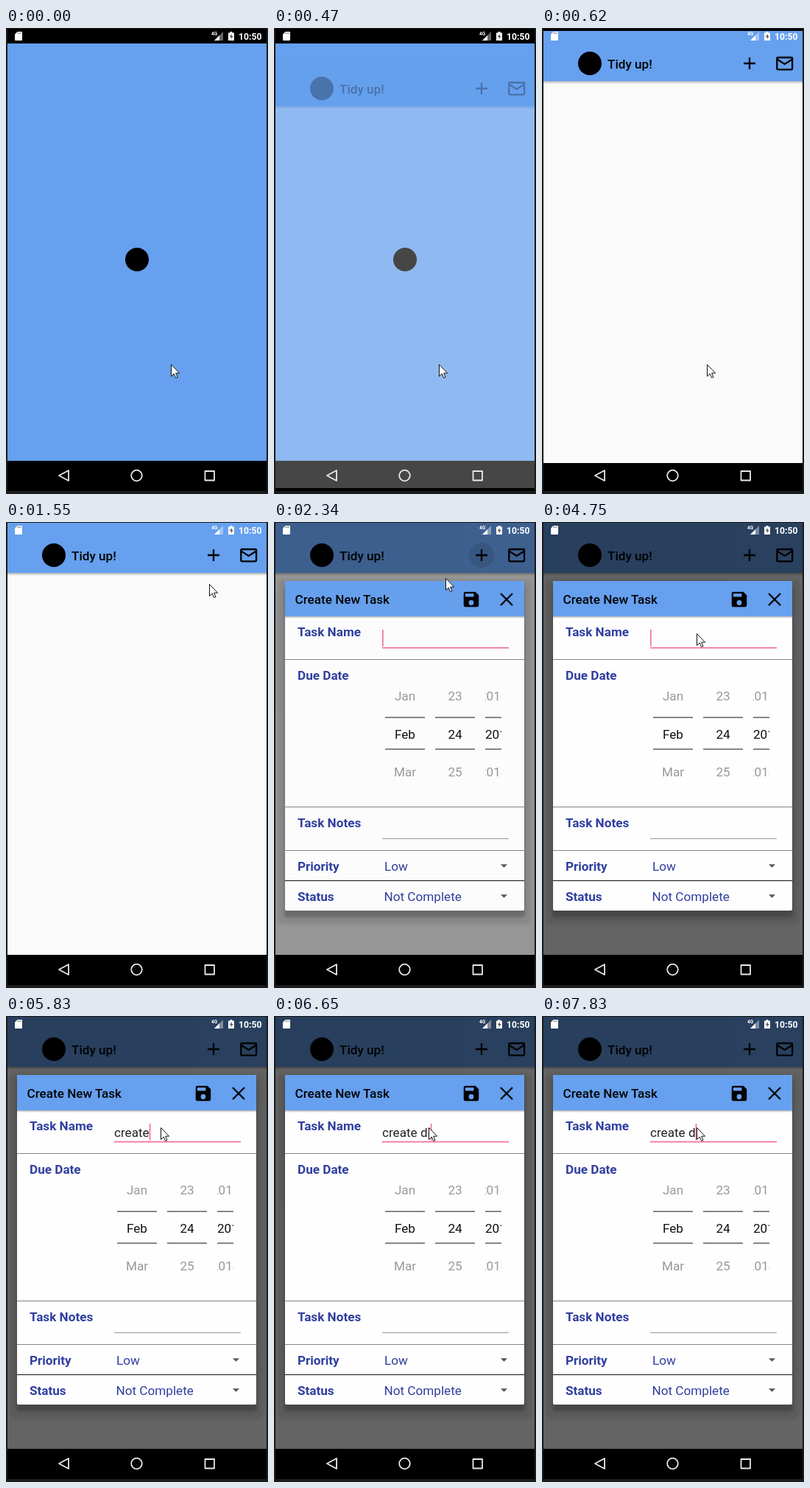
An HTML page for the animation above (8000 ms loop, 356x632 px).

```html
<!DOCTYPE html>
<html lang="en">
<head>
<meta charset="utf-8">
<title>Task list app</title>
<style>
  html, body { margin: 0; width: 100%; height: 100%; overflow: hidden; background: #1b1b1b; }
  svg { display: block; width: 100%; height: 100%; }
  text { font: 17.14px Roboto, sans-serif; white-space: pre; }
  .title { font-weight: 500; }
  .label { font-weight: 700; fill: #303f9f; }
  .choice { fill: #303f9f; }
  .near { fill: #999; }
  .mid { text-anchor: middle; }
  .line { fill: none; stroke: #000; stroke-width: 2.3; }

  #home, #dim, #dialog, #ripple, #pointer { animation: 8s step-end infinite; }
  #home { animation-name: open; }
  #dim { animation-name: dim; }
  #dialog { animation-name: appear; }
  #ripple { animation-name: ripple; }
  #pointer { animation-name: point; }

  @keyframes open {
    0% { opacity: 0; transform: translateY(37px); }
    5.875% { opacity: .28; transform: translateY(37px); }
    7.75% { opacity: 1; transform: translateY(3px); }
    9.25%, 100% { opacity: 1; transform: none; }
  }
  @keyframes dim {
    0% { opacity: 0; }
    29.25% { opacity: .4; }
    30.75% { opacity: .58; }
    32.25%, 100% { opacity: .6; }
  }
  @keyframes appear {
    0% { opacity: 0; }
    29.25% { opacity: .985; }
    30.75%, 100% { opacity: 1; }
  }
  @keyframes ripple {
    0% { opacity: 0; }
    29.25% { opacity: .1; }
    30.75% { opacity: .04; }
    32.25%, 100% { opacity: 0; }
  }
  @keyframes point {
    0% { transform: translate(224px, 456px); }
    12.625% { transform: translate(228px, 446px); }
    14.125% { transform: translate(238px, 418px); }
    16% { transform: translate(255px, 260px); }
    17.5% { transform: translate(269px, 116px); }
    19.375% { transform: translate(276px, 84px); }
    20.875% { transform: translate(280px, 65px); }
    22.375% { transform: translate(283px, 53px); }
    23.875% { transform: translate(284px, 49px); }
    27.375% { transform: translate(273px, 58px); }
    29.25% { transform: translate(233px, 76px); }
    30.75% { transform: translate(218px, 92px); }
    32.25% { transform: translate(210px, 105px); }
    34.125%, 100% { transform: translate(210px, 151px); }
  }
</style>
</head>
<body>
<svg viewBox="0 0 356 632">
  <defs>
    <linearGradient id="fall" x2="0" y2="1">
      <stop stop-opacity=".28"/><stop offset="1" stop-opacity="0"/>
    </linearGradient>
    <filter id="soft" x="-10%" y="-10%" width="120%" height="120%"><feGaussianBlur stdDeviation="2"/></filter>
    <clipPath id="yearClip"><path d="M287 215h22v150h-22z"/></clipPath>
    <path id="arrow" d="M-4.5-2.2h9L0 2.3z" fill="#555"/>
  </defs>

  <path fill="#000" d="M2 1h352v627H2z"/>
  <path fill="#66a0ee" d="M2 21h352v566H2z"/>
  <circle cx="178" cy="314" r="16"/>

  <g id="home">
    <path fill="#fafafa" d="M2 69h352v518H2z"/>
    <path fill="#66a0ee" d="M2 1h352v68H2z"/>
    <path fill="url(#fall)" d="M2 69h352v4H2z"/>
    <circle cx="65" cy="45" r="16"/>
    <text class="title" x="89" y="52">Tidy up!</text>
    <circle id="ripple" cx="282" cy="45" r="17"/>
    <path class="line" d="M274 45h16M282 37v16"/>
    <rect class="line" x="319.3" y="37" width="20.8" height="16.3" rx="1.2"/>
    <path class="line" d="M319.5 39.5l10.2 6.4 10.2-6.4"/>
  </g>

  <path id="dim" d="M2 1h352v586H2z"/>

  <g id="dialog">
    <rect x="5" y="78" width="345" height="468" rx="8" opacity=".09" filter="url(#soft)"/>
    <rect x="14" y="86" width="327" height="450" rx="4" opacity=".22" filter="url(#soft)"/>
    <rect x="15" y="80" width="325" height="447" rx="2" fill="#fefefe"/>
    <path fill="#66a0ee" d="M15 128V82q0-2 2-2h321q2 0 2 2v46z"/>
    <path fill="url(#fall)" d="M15 128h325v3H15z"/>
    <text class="title" x="28.5" y="111">Create New Task</text>
    <path transform="translate(254.3 91.3) scale(1.14)" fill-rule="evenodd"
      d="M17 3H5a2 2 0 0 0-2 2v14a2 2 0 0 0 2 2h14a2 2 0 0 0 2-2V7zM12 19a3 3 0 1 1 0-6 3 3 0 0 1 0 6zM15 9H5V5h10z"/>
    <path class="line" d="M308 97l16 16M324 97l-16 16"/>

    <path stroke="#858585" d="M15 186.5h325M15 386.5h325M15 445.5h325"/>
    <path stroke="#111" d="M15 486.5h325"/>
    <path stroke="#999" d="M147 429.5h172"/>
    <path stroke="#f5709f" stroke-width="1.7" d="M147 170.7h172"/>

    <g class="label">
      <text class="label" x="32" y="155">Task Name</text>
      <text class="label" x="32" y="214">Due Date</text>
      <text class="label" x="32" y="414">Task Notes</text>
      <text class="label" x="32" y="473">Priority</text>
      <text class="label" x="32" y="514">Status</text>
    </g>
    <text class="choice" x="150" y="473">Low</text>
    <text class="choice" x="149.5" y="514">Not Complete</text>
    <use href="#arrow" x="312.5" y="466.5"/>
    <use href="#arrow" x="312.5" y="507.5"/>

    <path stroke="#777" stroke-width="1.7" d="M151 265.2h54M219 265.2h54M287 265.2h22M151 308.2h54M219 308.2h54M287 308.2h22"/>
    <g class="mid">
      <text class="near" x="178" y="242">Jan</text>
      <text x="178" y="294" fill="#111">Feb</text>
      <text class="near" x="178" y="345">Mar</text>
      <text class="near" x="246" y="242">23</text>
      <text x="246" y="294" fill="#111">24</text>
      <text class="near" x="246" y="345">25</text>
    </g>
    <g clip-path="url(#yearClip)">
      <text class="near" x="279" y="242">2016</text>
      <text x="287" y="294" fill="#111">2017</text>
      <text class="near" x="279" y="345">2018</text>
    </g>

    <text id="entry" x="147" y="164" fill="#222"></text>
    <rect id="caret" x="147" y="146" width="1.7" height="22.5" fill="#f5709f"/>
  </g>

  <g fill="#fff">
    <path d="M15.5 5H21q1 0 1 1v10q0 1-1 1h-8q-1 0-1-1V8.500z"/>
    <path stroke="#777" d="M16 6v2M18 6v2M20 6v2"/>
    <path d="M295 5v12h-12z" opacity=".4"/>
    <path d="M290 10v7h-7z"/>
    <text x="279" y="10" style="font-size:6.500px;font-weight:700">4G</text>
    <path d="M304.500 5h3v1.500h2.500V17h-8V6.500h2.500z"/>
    <path d="M306.700 8l-3 4h2v3l3-4h-2z" fill="#555"/>
    <text x="316" y="15.500" style="font-size:12.200px;font-weight:700">10:50</text>
  </g>

  <g fill="none" stroke="#e8e8e8" stroke-width="1.8" stroke-linejoin="round">
    <path d="M72 607l13-7v14z"/>
    <circle cx="177.500" cy="607" r="7.300"/>
    <path d="M270.500 601h12.500v12.500h-12.500z"/>
  </g>

  <g id="pointer">
    <path d="M.5.5v16l3.700-3.500 2.500 5.500 2.300-1-2.400-5.400h5z" fill="#fff" stroke="#111"/>
  </g>
</svg>
<script>
  const entry = document.getElementById('entry');
  const caret = document.getElementById('caret');
  const clock = document.getElementById('pointer').getAnimations()[0];

  // Start time, typed text, caret shown
  const typing = [
    [0, '', 1], [2730, '', 0], [3260, '', 1], [3760, '', 0], [4190, '', 1],
    [4750, 'c', 1], [5000, 'cr', 1], [5120, 'cre', 1], [5240, 'creat', 1],
    [5390, 'create', 1], [5830, 'create', 0], [5980, 'create ', 1],
    [6380, 'create d', 1], [6530, 'create di', 1], [6650, 'create dis', 1],
    [7020, 'create di', 1], [7270, 'create d', 1], [7830, 'create d', 0]
  ];

  function draw() {
    const time = (clock.currentTime || 0) % 8000;
    const [, text, shown] = typing.findLast(([start]) => start <= time);
    entry.textContent = text;
    caret.setAttribute('x', 147 + (text ? entry.getComputedTextLength() : 0));
    caret.style.visibility = shown ? 'visible' : 'hidden';
    requestAnimationFrame(draw);
  }
  draw();
</script>
</body>
</html>
```
